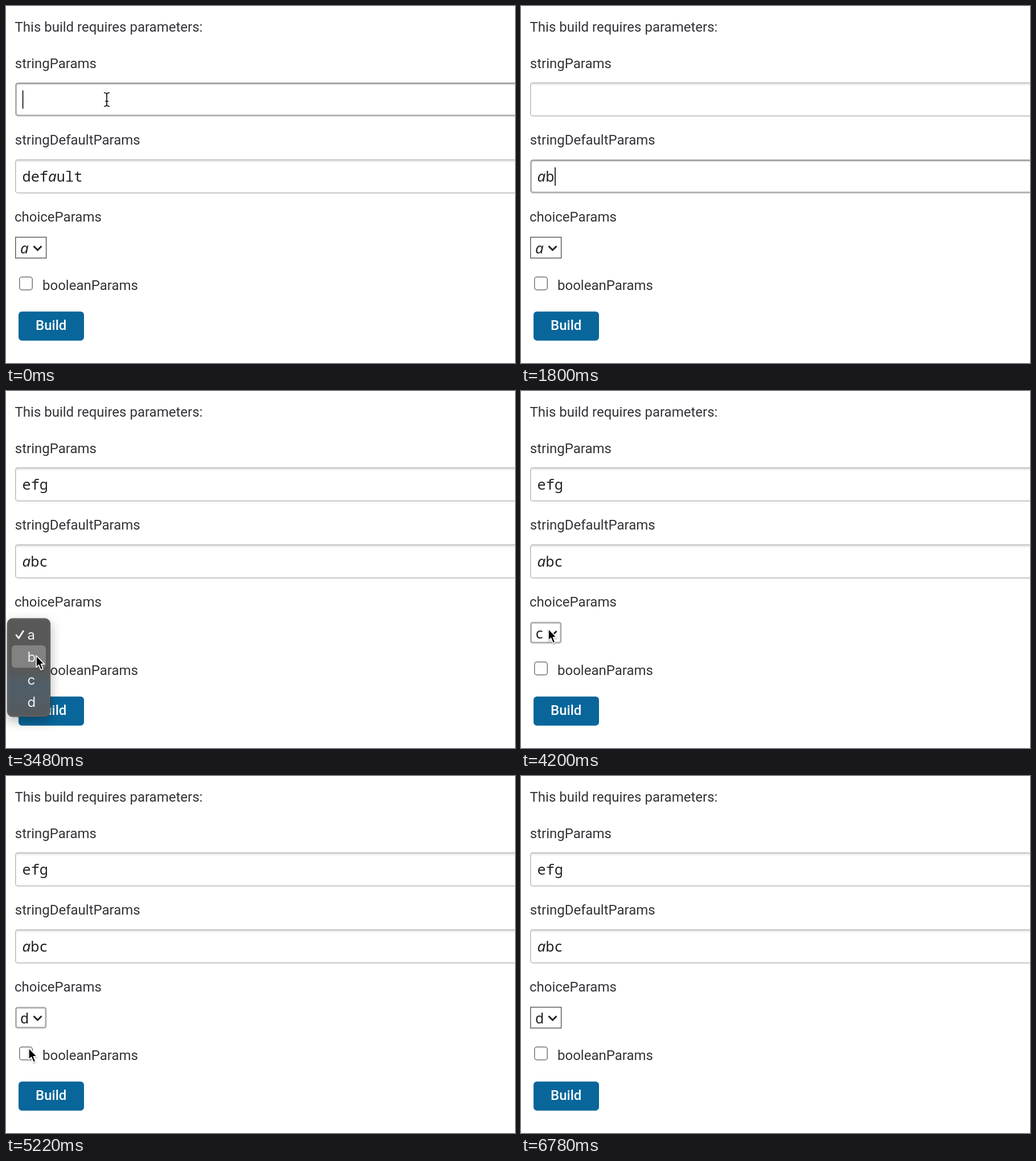
Recreate the animation shown at these times as an HTML page. Size 894 by 626 pixels, loop 6840 ms.

```html
<!DOCTYPE html>
<html lang="en">
<head>
<meta charset="utf-8">
<title>Build parameters</title>
<style>
  html, body { margin: 0; width: 100%; height: 100%; overflow: hidden; background: #fff; }
  svg { display: block; width: 894px; height: 626px; }
  text { white-space: pre; }
  .label { font: 24px Roboto, sans-serif; fill: #333338; }
  .value { font: 25.3px "Noto Sans Mono", "DejaVu Sans Mono", monospace; fill: #222; }
  .value tspan { font: italic 26px "Noto Sans", "Open Sans", sans-serif; }
  .item { font: 24px Inter, sans-serif; fill: #f2f2f2; }
  .build { font: 500 24px Roboto, sans-serif; fill: #fff; }
</style>
</head>
<body>
<svg viewBox="0 0 894 626">
  <defs>
    <linearGradient id="tintFill" x1="0" y1="0" x2="0" y2="1">
      <stop offset="0" stop-color="#3a6c8e" stop-opacity="0"/>
      <stop offset=".35" stop-color="#3a6c8e" stop-opacity=".32"/>
      <stop offset="1" stop-color="#3a6c8e" stop-opacity=".1"/>
    </linearGradient>
    <linearGradient id="inset" x1="0" y1="0" x2="0" y2="1">
      <stop offset="0" stop-color="#000" stop-opacity=".11"/>
      <stop offset="1" stop-color="#000" stop-opacity="0"/>
    </linearGradient>
    <filter id="shadow" x="-60%" y="-30%" width="220%" height="160%">
      <feDropShadow dx="0" dy="7" stdDeviation="10" flood-color="#000" flood-opacity=".3"/>
    </filter>
    <filter id="soft" x="-50%" y="-50%" width="200%" height="200%">
      <feDropShadow dx="0" dy="1.5" stdDeviation="1.3" flood-color="#000" flood-opacity=".35"/>
    </filter>
  </defs>

  <g class="label">
    <text x="15.5" y="45">This build requires parameters:</text>
    <text x="15.8" y="109">stringParams</text>
    <text x="15.8" y="243">stringDefaultParams</text>
    <text x="15" y="378">choiceParams</text>
    <text x="64" y="498">booleanParams</text>
  </g>

  <g id="fields"></g>

  <rect id="select" fill="#fff"/>
  <text id="choice" class="value" x="25" y="434"/>
  <path d="M48.5 421l7 7 7-7" fill="none" stroke="#222" stroke-width="3"/>

  <rect id="box" x="23.75" y="475.25" width="22.5" height="22.5" rx="4" stroke-width="1.5"/>
  <path id="tick" d="M28.5 486.5l4.5 5 8.5-11" fill="none" stroke="#fff" stroke-width="3.2"/>

  <rect id="button" x="22" y="535.7" width="115" height="51" rx="6"/>
  <text class="build" x="52" y="568">Build</text>

  <g id="menu">
    <rect x="2.5" y="399" width="75" height="172" rx="9" fill="#585858" stroke="#3d3d3d" filter="url(#shadow)"/>
    <rect id="tint" x="3" y="488" width="74" height="82.5" rx="8.5" fill="url(#tintFill)"/>
    <rect x="3.5" y="400" width="73" height="170" rx="8" fill="none" stroke="#7b7b7b" stroke-opacity=".7"/>
    <rect id="hover" x="10" width="60" height="39.3" rx="6" fill="#828282"/>
    <g id="items" class="item"></g>
    <path id="mark" d="M18 428l4.3 5.5 8-12.5" fill="none" stroke="#fff" stroke-width="2.8" stroke-linecap="round" stroke-linejoin="round"/>
  </g>

  <g id="arrow" filter="url(#soft)">
    <path d="M0 0V20.5L4.6 16.3 8.2 25 12 23.4 8.4 14.9H14.6Z" fill="#000" stroke="#fff" stroke-width="1.6" stroke-linejoin="round"/>
  </g>
  <path id="beam" d="M-5-12Q0-12 0-8.5Q0-12 5-12M0-9V9M-5 12Q0 12 0 8.5Q0 12 5 12M-3 3H3" fill="none" stroke="#111" stroke-width="1.7"/>
</svg>

<script>
const LOOP = 6840, STEP = 60, ROW = 39.3, CHAR = 15.2;
const $ = id => document.getElementById(id);
const set = (el, attrs) => { for (const k in attrs) el.setAttribute(k, attrs[k]); };
const show = (el, on) => set(el, { visibility: on ? 'visible' : 'hidden' });
const within = (t, a, b) => t >= a && t < b;

// The field font has a single-storey "a".
const write = (el, s) => {
  if (el.dataset.s === s) return;
  el.dataset.s = s;
  el.innerHTML = s.replace(/a/g, '<tspan>a</tspan>');
};

function makeField(top) {
  const g = document.createElementNS('http://www.w3.org/2000/svg', 'g');
  g.innerHTML = `<rect fill="#fff"/>
    <rect x="18" y="${top + 1.5}" width="890" height="5" fill="url(#inset)"/>
    <rect x="29" y="${top + 14}" width="${CHAR * 7}" height="32" fill="#b4d7ff"/>
    <text class="value" x="28.5" y="${top + 39}"/>
    <rect y="${top + 14}" width="1.6" height="32" fill="#000"/>`;
  $('fields').append(g);
  const [frame, , selection, text, caret] = g.children;
  return (value, focused, selected) => {
    const w = focused ? 3 : 1.5;
    set(frame, { x: 16 + w / 2, y: top + w / 2, width: 900, height: 59.5 - w, rx: 4,
      stroke: focused ? '#b0b0b0' : '#b8b8b8', 'stroke-width': w });
    write(text, value);
    show(selection, selected);
    show(caret, focused && !selected);
    set(caret, { x: 28.8 + value.length * CHAR });
  };
}
const first = makeField(134), second = makeField(269);

$('items').innerHTML = [...'abcd'].map((c, i) =>
  `<text x="37.5" y="${436 + i * ROW}">${c}</text>`).join('');

// Pointer path: time, x, y
const path = [
  [0, 177, 164], [180, 177, 164], [480, 177, 300], [2100, 177, 300],
  [2280, 177, 166], [2940, 177, 164], [3240, 52, 425], [3360, 52, 428],
  [3480, 53, 464], [3600, 51, 494], [3900, 50, 498], [4200, 48, 417],
  [4380, 47, 421], [4800, 42, 471], [4920, 42, 472], [5100, 42, 473],
  [5400, 36, 484], [5520, 36, 484], [5760, 118, 484], [6000, 161, 482],
  [6180, 163, 483], [6480, 169, 582], [6540, 166, 580], [6720, 90, 563], [LOOP, 90, 563]
];
function pointerAt(t) {
  const i = path.findIndex(p => p[0] > t);
  const [t0, x0, y0] = path[i - 1], [t1, x1, y1] = path[i];
  const u = (t - t0) / (t1 - t0), e = u * u * (3 - 2 * u);
  return [x0 + (x1 - x0) * e, y0 + (y1 - y0) * e];
}

// Last value whose start time has passed
const at = (t, steps) => steps.reduce((v, [start, next]) => t >= start ? next : v, steps[0][1]);

function drawMenu(t, y) {
  const early = t < 4300;
  const [open, close, index] = early ? [3360, 3780, 0] : [4320, 5040, 2];
  const alpha = t < open ? 0 : Math.max(0, Math.min(1, 1 - (t - close) / 180));
  const shift = -index * ROW;
  const row = Math.floor((y - 407 - shift) / ROW);
  const flash = t === 3660 || t === 4920;
  set($('menu'), { opacity: alpha, transform: `translate(0 ${shift})` });
  set($('hover'), { y: 446 + (row - 1) * ROW,
    opacity: row >= 0 && row < 4 && !flash ? 1 : 0 });
  set($('mark'), { transform: `translate(0 ${index * ROW})` });
  set($('tint'), { opacity: early ? 1 : 0 });
}

function render(t) {
  const [x, y] = pointerAt(t);
  first(at(t, [[0, ''], [2580, 'e'], [2640, 'ef'], [2760, 'efg']]),
    t < 480 || within(t, 2280, 3300), false);
  second(at(t, [[0, 'default'], [840, ''], [1500, 'a'], [1740, 'ab'], [2040, 'abc']]),
    within(t, 480, 2280), within(t, 540, 840));

  const active = within(t, 3300, 5460), w = active ? 3 : 1.5;
  set($('select'), { x: 16 + w / 2, y: 404.7 + w / 2, width: 55.4 - w, height: 38 - w,
    rx: active ? 3 : 0, stroke: active ? '#b0b0b0' : '#5c5c5c', 'stroke-width': w });
  write($('choice'), at(t, [[0, 'a'], [3780, 'c'], [5040, 'd']]));

  const checked = within(t, 5460, 6120);
  set($('box'), { fill: checked ? '#0a78ff' : '#fff', stroke: checked ? '#0a78ff' : '#747474' });
  show($('tick'), checked);
  set($('button'), { fill: within(t, 6600, 6780) ? '#095987' : '#08669a' });
  drawMenu(t, y);

  const hidden = within(t, 840, 2160) || within(t, 2580, 2940) || t >= 6780;
  const typing = within(y, 134, 194) || within(y, 269, 329);
  show($('beam'), !hidden && typing);
  show($('arrow'), !hidden && !typing);
  set($(typing ? 'beam' : 'arrow'), { transform: `translate(${x} ${y})` });
}

const begin = performance.now();
function frame() {
  const t = (performance.now() - begin) % LOOP;
  render(Math.floor(t / STEP) * STEP);
  requestAnimationFrame(frame);
}
frame();
</script>
</body>
</html>
```
